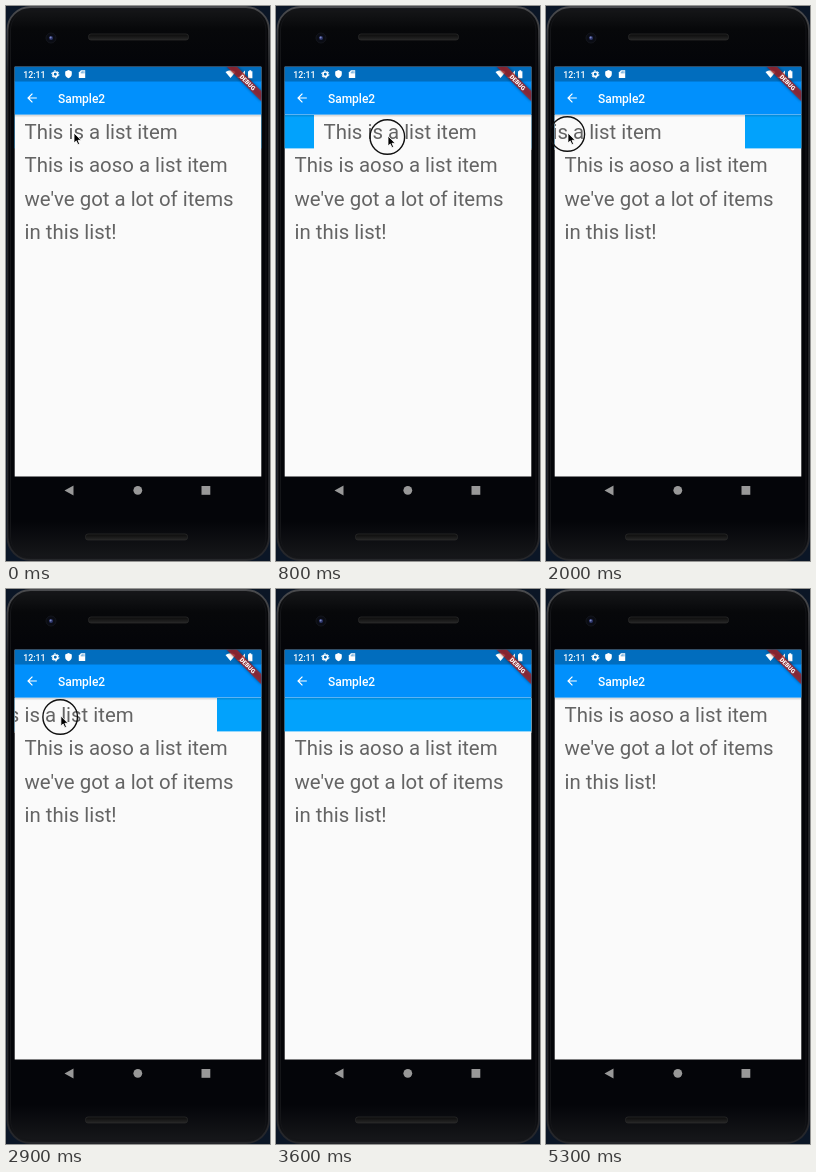
Recreate the animation shown at these times as an HTML page. Size 264x555 px, loop 5400 ms.

```html
<!DOCTYPE html>
<html lang="en">
<head>
<meta charset="utf-8">
<title>Swipe to dismiss</title>
<style>
  html, body { margin: 0; width: 100%; height: 100%; overflow: hidden; background: #0b1626; }
  svg { display: block; width: 264px; height: 555px; font-family: Roboto, sans-serif; }
  .item { font-size: 20.4px; fill: #646464; }
  .white { fill: #fff; }
</style>
</head>
<body>
<svg viewBox="0 0 264 555">
  <defs>
    <clipPath id="screen"><rect x="8.7" y="60.8" width="246.6" height="409.6"/></clipPath>
    <linearGradient id="body" x2="0" y2="1">
      <stop stop-color="#17181a"/><stop offset=".04" stop-color="#07080a"/>
      <stop offset=".1" stop-color="#040509"/><stop offset=".93" stop-color="#040509"/>
      <stop offset="1" stop-color="#17181b"/>
    </linearGradient>
    <linearGradient id="edge" x2="0" y2="1">
      <stop stop-color="#4a4b4e"/><stop offset=".12" stop-color="#232427"/>
      <stop offset="1" stop-color="#26272b"/>
    </linearGradient>
    <linearGradient id="shade" x2="0" y2="1">
      <stop stop-opacity=".18"/><stop offset="1" stop-opacity="0"/>
    </linearGradient>
    <linearGradient id="slot" x2="0" y2="1">
      <stop stop-color="#0b0b0b"/><stop offset="1" stop-color="#262626"/>
    </linearGradient>
    <filter id="blur" x="-20%" y="-80%" width="140%" height="260%"><feGaussianBlur stdDeviation="1.6"/></filter>
  </defs>

  <!-- phone body -->
  <rect x="1.5" y="1" width="261.5" height="553" rx="23" fill="url(#body)" stroke="url(#edge)" stroke-width="1.8"/>
  <rect x="4.5" y="4" width="255.5" height="547" rx="20" fill="none" stroke="#141518"/>
  <g fill="url(#slot)" stroke="#2a2a2a" stroke-width=".8">
    <rect x="82.5" y="28" width="100" height="6" rx="2.5"/>
    <rect x="79.5" y="528" width="102" height="6" rx="2.5"/>
  </g>
  <circle cx="45" cy="32" r="5" fill="#0a0c14" stroke="#14161c"/>
  <circle cx="45" cy="32" r="2" fill="#2c3568"/>
  <circle cx="44.6" cy="31.6" r="1" fill="#7d88c4"/>
  <g fill="#989898">
    <path d="M58.5 484.5l9-5v10z"/>
    <circle cx="131.8" cy="484.3" r="4.4"/>
    <rect x="195.5" y="480" width="8.8" height="8.8"/>
  </g>

  <g clip-path="url(#screen)">
    <rect x="8" y="60" width="248" height="411" fill="#fafafa"/>
    <rect id="back" x="8" y="109" width="248" height="33.4" fill="#02a2fc"/>
    <g id="swiped">
      <rect x="9" y="109" width="246" height="35" fill="#fafafa"/>
      <text class="item" x="18.5" y="133">This is a list item</text>
    </g>
    <g id="rest" class="item">
      <text x="18.5" y="166.4">This is aoso a list item</text>
      <text x="18.5" y="200">we've got a lot of items</text>
      <text x="18.5" y="233.4">in this list!</text>
    </g>

    <!-- bars -->
    <rect x="8" y="108.6" width="248" height="3" fill="url(#shade)"/>
    <rect x="8" y="75" width="248" height="33.6" fill="#0190fc"/>
    <rect x="8" y="60" width="248" height="15.5" fill="#016dbe"/>
    <g class="white">
      <path transform="translate(18.8 84.8) scale(.6)" d="M20 11H7.83l5.59-5.59L12 4l-8 8 8 8 1.41-1.41L7.83 13H20z"/>
      <text x="51.9" y="96.7" font-size="12" font-weight="500">Sample2</text>
      <text x="17.2" y="71.7" font-size="8.8" font-weight="500">12:11</text>
      <circle cx="49.3" cy="68.3" r="2.3" fill="none" stroke="#fff" stroke-width="1.7"/>
      <circle cx="49.3" cy="68.3" r="3.6" fill="none" stroke="#fff" stroke-width="1" stroke-dasharray="1.9 1.87"/>
      <path d="M62.5 64l3.3 1.5v2.4q0 3-3.3 4.4-3.3-1.4-3.3-4.4v-2.4z"/>
      <path d="M75 64.3h4.2v7.8h-6.4v-5.6z"/>
      <path d="M75.3 65.6v1.8M76.7 65.2v2.2M78 65.2v2.2" stroke="#016dbe" stroke-width=".6"/>
      <path d="M224.5 72l-5-6q5-3.6 10 0z"/>
      <path d="M231.5 72h7.5v-7.5z"/>
      <path d="M242 65.2h1.2v-1h2v1h1.2v7H242z"/>
    </g>
    <g transform="translate(255 61) rotate(45)">
      <rect x="-24" y="16.8" width="48" height="7.2" opacity=".5" filter="url(#blur)"/>
      <rect x="-40" y="16.8" width="80" height="7.2" fill="#b71c1c" fill-opacity=".72"/>
      <text class="white" x="1.5" y="22.6" font-size="6.1" font-weight="900" text-anchor="middle">DEBUG</text>
    </g>
  </g>

  <g id="pointer">
    <circle id="ring" cx="-.7" cy="1" r="17.3" fill="none" stroke="#111" stroke-width="1.4"/>
    <path d="M0 0V10l2.3-2.1 1.6 3.7 1.7-.7-1.6-3.6h3.2z" fill="#000" stroke="#fff" stroke-width=".8"/>
  </g>
</svg>
<script>
const LOOP = 5400, ROW = 33.6, WIDTH = 246, LAG = 100;
const PRESS = 250, COLLAPSE = 3640, COLLAPSE_TIME = 200;

// pointer path: [ms, x]
const path = [[0, 68], [300, 69], [700, 109], [800, 112], [1100, 112], [1500, 70], [1900, 24],
  [2000, 22], [2500, 14], [2800, 36], [2900, 54.5], [3200, 190], [3400, 300], [3500, 330]];

const $ = id => document.getElementById(id);
const clamp = (v, lo, hi) => Math.min(hi, Math.max(lo, v));
const move = (id, x, y) => $(id).setAttribute('transform', `translate(${x} ${y})`);
const show = (id, on) => $(id).setAttribute('visibility', on ? 'visible' : 'hidden');

function slope(i) {
  const a = path[Math.max(i - 1, 0)], b = path[Math.min(i + 1, path.length - 1)];
  return (b[1] - a[1]) / (b[0] - a[0]);
}

// cubic Hermite curve through the path points
function pointerX(t) {
  t = clamp(t, 0, path[path.length - 1][0]);
  const i = Math.max(path.findIndex(p => p[0] >= t), 1);
  const [t0, x0] = path[i - 1], [t1, x1] = path[i];
  const d = t1 - t0, u = (t - t0) / d, v = 1 - u;
  return v * v * ((1 + 2 * u) * x0 + u * d * slope(i - 1))
       + u * u * ((1 + 2 * v) * x1 - v * d * slope(i));
}

function draw(t) {
  const drag = Math.round(pointerX(t - LAG) - 80);
  move('swiped', clamp(t < 600 ? Math.max(0, drag) : drag, -WIDTH, WIDTH), 0);
  show('swiped', t < COLLAPSE);

  const u = clamp((t - COLLAPSE) / COLLAPSE_TIME, 0, 1);
  const closed = u * u * (3 - 2 * u);
  $('back').setAttribute('height', (ROW - .2) * (1 - closed));
  move('rest', 0, -ROW * closed);

  move('pointer', pointerX(t), 127 + 3 * Math.exp(-(((t - 800) / 300) ** 2)));
  show('ring', t >= PRESS);
}

const start = performance.now();
function tick() {
  draw((performance.now() - start) % LOOP);
  requestAnimationFrame(tick);
}
tick();
</script>
</body>
</html>
```
